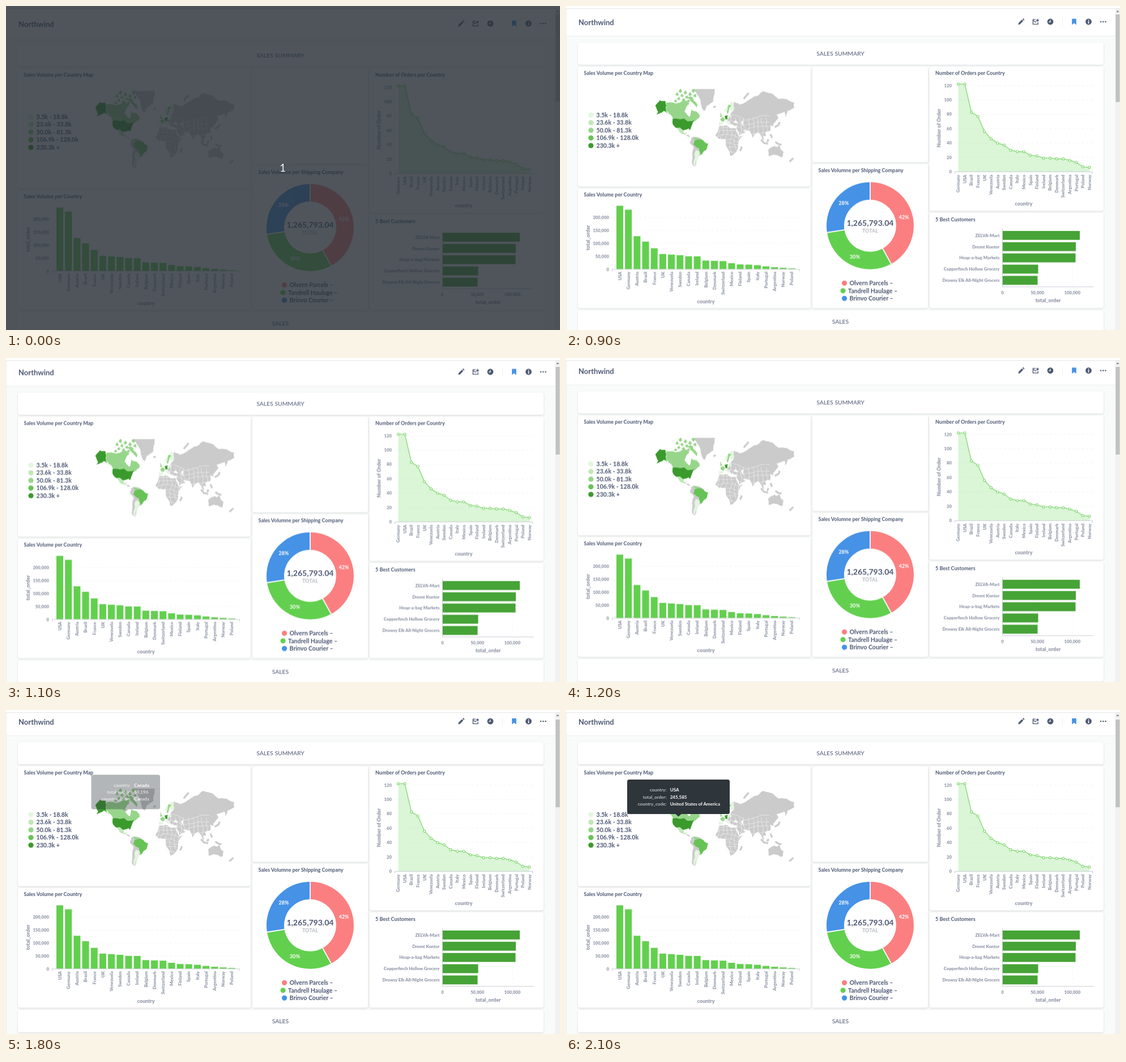
Write an HTML page that moves like this. It is 978 px wide and 573 px high and loops after 8000 ms.

```html
<!DOCTYPE html>
<html lang="en">
<head>
<meta charset="utf-8">
<title>Northwind dashboard</title>
<style>
html, body { margin: 0; width: 100%; height: 100%; overflow: hidden; background: #f9fbfb; }
svg { display: block; width: 978px; height: 573px; font-family: Lato, sans-serif; }
#page, #thumb, #veil, .tip { animation: 8s step-end infinite; }
#page { animation-name: page; }
#thumb { animation-name: thumb; }
#veil { animation-name: veil; }
#tipA { animation-name: tipA; }
#tipB { animation-name: tipB; }
.card { fill: #fff; filter: drop-shadow(0 1px 1.5px rgba(0,0,0,.14)); }
@keyframes page {
  0% { transform: translateY(11px); }
  11.25% { transform: translateY(7.8px); }
  12.5% { transform: translateY(6.2px); }
  13.75% { transform: translateY(4.5px); }
  15% { transform: translateY(2.2px); }
  16.25%, 100% { transform: none; }
}
@keyframes thumb {
  0% { transform: none; }
  11.25% { transform: translateY(.8px); }
  13.75% { transform: translateY(1.7px); }
  16.25%, 100% { transform: translateY(3px); }
}
@keyframes veil { 0% { opacity: 1; } 1.25%, 100% { opacity: 0; } }
@keyframes tipA {
  0% { opacity: 0; }
  22.5% { opacity: .36; }
  23.75% { opacity: .8; }
  25%, 100% { opacity: 0; }
}
@keyframes tipB {
  0% { opacity: 0; transform: translate(3px, -3px); }
  25% { opacity: 1; transform: translate(3px, -3px); }
  26.25%, 100% { opacity: 1; transform: none; }
}
</style>
</head>
<body>
<svg id="stage" viewBox="0 0 978 573"></svg>
<script>
const DARK = '#4c5773', SOFT = '#949aab', GRID = '#f0f1f1', AXIS = '#c9ccd3', GREY = '#cbcbcb';
const GREENS = ['#e3f6df', '#bfe8b6', '#97d68a', '#67c356', '#3a9a2c'];

// y is the middle of the capitals
const text = (x, y, size, str, fill = DARK, anchor = 'start', weight = 700, turn = 0) =>
  `<text transform="translate(${x} ${y}) rotate(${turn})" dy="${size * .36}" font-size="${size}" ` +
  `font-weight="${weight}" fill="${fill}" text-anchor="${anchor}">${str}</text>`;
const tick = (x, y, str, anchor = 'end', turn = 0) => text(x, y, 7.7, str, SOFT, anchor, 900, turn);
const axisName = (x, y, str, turn = 0) => text(x, y, 8.9, str, SOFT, 'middle', 900, turn);
const rect = (x, y, w, h, fill, more = '') =>
  `<rect x="${x}" y="${y}" width="${w}" height="${h}" fill="${fill}" ${more}/>`;
const path = (d, fill = 'none', more = '') => `<path d="${d}" fill="${fill}" ${more}/>`;
const line = (d, stroke = AXIS, more = '') => path(d, 'none', `stroke="${stroke}" ${more}`);
const dot = (x, y, r, fill, more = '') => `<circle cx="${x}" cy="${y}" r="${r}" fill="${fill}" ${more}/>`;
const card = (x, y, r, b) => rect(x, y, r - x, b - y, '#fff', 'rx="4" class="card"');
const each = (list, fn) => list.map(fn).join('');
const range = (n, from = 0, step = 1) => Array.from({ length: n }, (_, i) => from + i * step);
const dashes = 'stroke-dasharray="4 4" stroke-width=".8"';

let seed = 7;
const rand = () => (seed = seed * 16807 % 2147483647) / 2147483647;

const mercator = (lon, lat) =>
  [275.8 + lon * .707, 231 - 40.5 * Math.log(Math.tan(Math.PI / 4 + lat * Math.PI / 360))];

// Breaks an edge into a ragged coast by shifting midpoints sideways.
function ragged(a, b, depth = 3) {
  if (!depth) return [b];
  const k = (rand() - .5) * .22, dx = b[0] - a[0], dy = b[1] - a[1];
  const mid = [(a[0] + b[0]) / 2 - dy * k, (a[1] + b[1]) / 2 + dx * k];
  return [...ragged(a, mid, depth - 1), ...ragged(mid, b, depth - 1)];
}

// Corners as "lon lat,lon lat", "/" between pieces.
const outline = (geo, closed = true) => each(geo.split('/'), piece => {
  const pts = piece.split(',').map(p => mercator(...p.split(' ').map(Number)));
  const ends = closed ? [...pts.slice(1), pts[0]] : pts.slice(1);
  const coast = ends.flatMap((b, i) => ragged(pts[i], b));
  return 'M' + [pts[0], ...coast].map(p => p.map(v => v.toFixed(1)).join(' ')).join('L') + (closed ? 'Z' : '');
});

const geo = {
  eurasia: '13 46,20 40,23 37,26 40,27 37,36 36,35 29,43 13,59 22,51 25,57 26,68 25,77 8,81 16,90 22,94 17,98 9,104 1,101 13,' +
    '109 12,107 21,120 25,119 37,127 34,128 40,140 50,136 55,155 59,157 51,163 60,180 64,180 69,140 72,104 77,70 72,44 67,28 70,28 60,19 54',
  africa: '-6 36,10 37,20 31,33 31,43 11,51 12,40 -4,40 -15,32 -29,20 -35,12 -17,9 4,-8 5,-17 14,-10 29',
  americas: '-77 8,-60 9,-51 4,-54 -34,-58 -34,-68 -54,-75 -50,-71 -18,-81 -5/-92 15,-84 15,-78 8,-85 11',
  greenland: '-73 79,-54 70,-48 61,-43 60,-38 66,-22 70,-18 79',
  australia: '114 -22,130 -12,136 -15,142 -11,153 -27,149 -38,136 -33,116 -35',
  seas: '28 42,33 46,41 42/48 45,53 45,53 37,49 38',
  islands: '131 33,140 37,143 43/97 4,104 -5,114 -8/112 -2,116 4/133 -2,148 -9/121 17,125 8/177 -39,168 -46/49 -14,45 -24/54 72,66 76/-22 64.5,-16 65',
  canada: '-141 69,-115 68,-95 71,-82 68,-94 59,-81 52,-78 62,-64 59,-56 52,-66 45,-83 43,-95 47,-123 47,-137 59,-141 60/' +
    '-64 64,-75 69,-88 73,-78 74,-62 67',
  usa: '-124 48,-95 49,-83 44,-68 47,-76 36,-81 26,-84 30,-97 26,-117 32,-124 40/-167 66,-156 71,-141 70,-141 60,-131 55,-145 60,-164 55,-160 59',
  mexico: '-117 32,-106 32,-97 26,-96 19,-88 21,-92 15,-105 20,-111 29',
  brazil: '-60 5,-50 3,-35 -7,-40 -21,-53 -33,-58 -18,-73 -8,-69 1',
  argentina: '-66 -22,-55 -27,-58 -37,-66 -45,-68 -54,-72 -50,-70 -30',
  palest: '5 59,10 64,25 71,12 60/21 69,29 69,30 62,22 60/-9 43,3 42,-2 37,-9 37/14 54,23 54,23 50,15 51/7 45,13 46,18 40,16 38',
  middle: '11 59,16 67,23 66,14 56/-5 48,2 51,8 48,4 43,-1 44/-5 51,1 52,-5 58/-72 11,-61 9,-62 4,-67 2,-71 7',
  germany: '6 53,14 54,13 48,8 48'
};

function land() {
  const ground = ['eurasia', 'africa', 'americas', 'greenland'];
  const borders = [
    ...range(12, -12, 11).map(lon => `${lon} 50,${lon + 4} 20,${lon - 3} 0,${lon + 3} -30`),
    ...range(9, -30, 10).map(lat => `-15 ${lat},20 ${lat + 5},55 ${lat - 4},118 ${lat + 3}`)
  ].join('/');
  const arctic = range(13, -121, 4).map(lon => {
    const lat = 70 + (lon + 121) * 1.25 % 8;
    return `${lon} ${lat},${lon + 5} ${lat + 1.6},${lon + 9} ${lat},${lon + 5} ${lat - 1}`;
  }).join('/');
  const tints = [['canada', 2], ['usa', 4], ['mexico', 1], ['argentina', 0], ['brazil', 3], ['palest', 0], ['middle', 2], ['germany', 4]];
  return each(ground, n => path(outline(geo[n]), GREY)) +
    line(outline(borders, false), '#fff', 'stroke-width=".5"') +
    path(outline(geo.seas), '#fff') + path(outline(geo.australia), GREY) +
    line(outline(geo.islands, false), GREY, 'stroke-width="3.2" stroke-linejoin="round"') +
    path(outline(arctic), GREENS[2]) +
    each(tints, ([n, i]) => path(outline(geo[n]), GREENS[i]));
}

function worldMap() {
  const legend = each(['3.5k - 18.8k', '23.6k - 33.8k', '50.0k - 81.3k', '106.9k - 128.0k', '230.3k +'], (s, i) =>
    dot(44, 185 + i * 13.5, 4.6, GREENS[i]) + text(53.5, 185 + i * 13.5, 10.6, s));
  return text(31.5, 110.7, 9, 'Sales Volume per Country Map') + legend +
    '<clipPath id="top"><rect x="150" y="139" width="253" height="150"/></clipPath>' +
    `<g clip-path="url(#top)">${land()}</g>`;
}

function barChart() {
  const sales = { USA: 245.6, Germany: 230.3, Austria: 128, Brazil: 106.9, France: 81.3, UK: 59, Venezuela: 56.8,
    Sweden: 54.5, Canada: 50.2, Ireland: 50, Belgium: 33.8, Denmark: 32.7, Switzerland: 31.7, Mexico: 23.6,
    Finland: 18.8, Spain: 18, Italy: 15.8, Portugal: 11.5, Argentina: 8.1, Norway: 5.7, Poland: 3.5 };
  const base = 457.8, k = .4575;
  return text(31.5, 326, 9, 'Sales Volume per Country') +
    each(range(5, 0, 50), v => (v ? line(`M81 ${base - v * k}H412.5`, GRID, dashes) : '') +
      tick(76, base - v * k, v ? v + ',000' : '0')) +
    each(Object.entries(sales), ([name, v], i) => {
      const x = 95 + i * 15.18;
      return rect(x - 6, base - v * k, 12, v * k, '#62d04e') + tick(x, 462, name, 'end', -90);
    }) +
    line(`M81.5 461.5V${base}H412.5v3.7`) +
    axisName(38.5, 402, 'total_order', -90) + axisName(247, 514.5, 'country');
}

function lineChart() {
  const orders = { Germany: 122, USA: 122, Brazil: 83, France: 77, UK: 56, Venezuela: 46, Austria: 40, Sweden: 37,
    Canada: 30, Italy: 28, Mexico: 28, Spain: 23, Finland: 22, Ireland: 19, Belgium: 19, Denmark: 18,
    Switzerland: 18, Argentina: 16, Portugal: 13, Poland: 7, Norway: 6 };
  const base = 285.3, k = 1.27;
  const pts = Object.values(orders).map((v, i) => [692.5 + i * 11.57, base - v * k]);
  const d = 'M' + pts.join('L');
  return text(652, 110.7, 9, 'Number of Orders per Country') +
    each(range(7, 0, 20), v => (v ? line(`M686 ${base - v * k}H930`, GRID, dashes) : '') +
      tick(681, base - v * k, v)) +
    path(`${d}V${base}H692.5Z`, '#88dc7a', 'opacity=".3"') +
    line(`M686.5 289V${base}H929.5v3.7`) + line(d, '#86d977', 'stroke-width="1.4"') +
    each(pts, ([x, y]) => dot(x, y, 2, '#fff', 'stroke="#86d977" stroke-width="1.2"')) +
    each(Object.keys(orders), (name, i) => tick(pts[i][0], 290.5, name, 'end', -90)) +
    axisName(658.5, 208, 'Number of Order', -90) + axisName(808, 342, 'country');
}

function donut() {
  const cx = 536.9, cy = 380.8;
  const at = (r, f) => [cx + r * Math.sin(f * 2 * Math.PI), cy - r * Math.cos(f * 2 * Math.PI)].map(v => v.toFixed(2));
  const parts = [
    { from: 0, to: .42, fill: '#fb7f80', label: '42%', name: 'Olvern Parcels –', x: 491.5 },
    { from: .42, to: .725, fill: '#62d04e', label: '30%', name: 'Tandrell Haulage –', x: 489 },
    { from: .725, to: 1, fill: '#4592e6', label: '28%', name: 'Brinvo Courier –', x: 491.5 }
  ];
  return text(445.5, 283, 9, 'Sales Volumne per Shipping Company') +
    each(parts, ({ from, to, fill, label, name, x }, i) => {
      const [lx, ly] = at(61.5, (from + to) / 2), y = 482.3 + i * 13.5;
      return path(`M${at(77, from)}A77 77 0 0 1 ${at(77, to)}L${at(46, to)}A46 46 0 0 0 ${at(46, from)}Z`, fill) +
        text(lx, ly, 9.1, label, '#fff', 'middle') + dot(x, y, 4.6, fill) + text(x + 9, y, 10.6, name);
    }) +
    each(parts, p => line(`M${at(45, p.from)}L${at(78, p.from)}`, '#fff', 'stroke-width="1.8"')) +
    text(cx, 375.5, 14, '1,265,793.04', DARK, 'middle') + text(cx, 390, 9, 'TOTAL', '#b8bbc3', 'middle');
}

function customers() {
  const best = { 'ZELVA-Mart': 136.5, 'Dremt Kontor': 129.5, 'Heap-a-bag Markets': 129,
    'Copperfinch Hollow Grocery': 63, 'Drowsy Elk All-Night Grocers': 62 };
  return text(652, 369.3, 9, '5 Best Customers') +
    each([832, 894], x => line(`M${x} 386V489`, GRID, dashes)) +
    each(Object.entries(best), ([name, w], i) => rect(770.5, 390 + i * 19.87, w, 15.8, '#46a336') +
      tick(765.5, 397.9 + i * 19.87, name)) +
    line('M770.5 386V488.8H931.5') +
    each(['0', '50,000', '100,000'], (s, i) => tick(770.5 + i * 61.7, 499.5, s, 'middle')) +
    axisName(851, 513, 'total_order');
}

function header() {
  const icon = (x, body) => `<g transform="translate(${x} 20)">${body}</g>`;
  return rect(0, -20, 970, 65.5, '#fff') + line('M0 45.5H970', '#eceeee') + text(22, 21.5, 13, 'Northwind') +
    icon(803.5, path('M-5.2 5.2l.8-3.2 5.8-5.8 2.4 2.4-5.8 5.8zM2.3-4.7l.8-.8q.6-.5 1.2 0l1.2 1.2q.5.6 0 1.2l-.8.8z', DARK)) +
    icon(829, line('M0-3.8H-4.6V4.4H4.2V1M-4.6-2.6L-.6.6 1.4-.4', DARK, 'stroke-width="1.3"') +
      path('M1-3.6h2v-2L6-2.6 3 .4v-1.8H1z', DARK)) +
    icon(855, dot(0, 0, 5.4, DARK) + line('M0-3.2V.4H-2.8', '#fff', 'stroke-width="1.2"')) +
    line('M876.5 13.5V26.5', '#eceeee') +
    icon(897, path('M-3.8-5.2h7.6v10.6L0 2.6l-3.8 2.8z', '#4592e6')) +
    icon(922.5, dot(0, 0, 5.4, DARK) + dot(0, -2.6, 1, '#fff') + rect(-.9, -.9, 1.8, 4.2, '#fff')) +
    icon(948.3, each([-4.2, 0, 4.2], x => dot(x, 0, 1.3, DARK)));
}

function tooltip(id, x, y, w, arrow, values) {
  const labels = ['country:', 'total_order:', 'country_code:'];
  return `<g id="${id}" class="tip">` + rect(x, y, w, 61, '#2e353b', 'rx="3.5"') +
    path(`M${arrow - 5} ${y + 61}h10l-5 4.5z`, '#2e353b') +
    each(values, (v, i) => text(x + 69.3, y + 18.5 + i * 12.2, 8, labels[i], '#b9bec3', 'end') +
      text(x + 75.7, y + 18.5 + i * 12.2, 8, v, '#fff')) + '</g>';
}

const cards = card(21, 57, 949, 96) + card(21, 99.5, 432, 311.5) + card(435, 99.5, 639, 268.5) +
  card(641.5, 99.5, 949, 354.5) + card(21, 315, 432, 526.5) + card(435, 272, 639, 526.5) +
  card(641.5, 358, 949, 526.5) + card(21, 530.5, 949, 570);

document.getElementById('stage').innerHTML =
  rect(0, 0, 978, 573, '#f9fbfb') +
  '<g id="page">' + header() + cards +
  text(484.5, 76.5, 10.4, 'SALES SUMMARY', DARK, 'middle', 400) + text(484.5, 550.5, 10.4, 'SALES', DARK, 'middle', 400) +
  worldMap() + barChart() + lineChart() + donut() + customers() + '</g>' +
  rect(0, 0, 978, 4, '#fff') + rect(0, 4, 978, 1, '#e4e6e6') + rect(0, 4, 1, 569, '#eceeee') +
  rect(969.5, 5, 8.5, 568, '#f1f1f1') + path('M971.3 11l2.6-3.4 2.6 3.4z', '#8a8a8a') +
  rect(970.3, 14, 7.2, 155, '#c1c1c1', 'id="thumb"') +
  tooltip('tipA', 150.5, 114.5, 121.5, 211, ['Canada', '50,196', 'Canada']) +
  tooltip('tipB', 108, 123, 181, 198.5, ['USA', '245,585', 'United States of America']) +
  '<g id="veil">' + rect(0, 0, 978, 573, 'rgba(41,48,56,.82)') +
  text(488.5, 286.5, 19, '1', '#f2f2f2', 'middle', 400) + '</g>';
</script>
</body>
</html>
```
